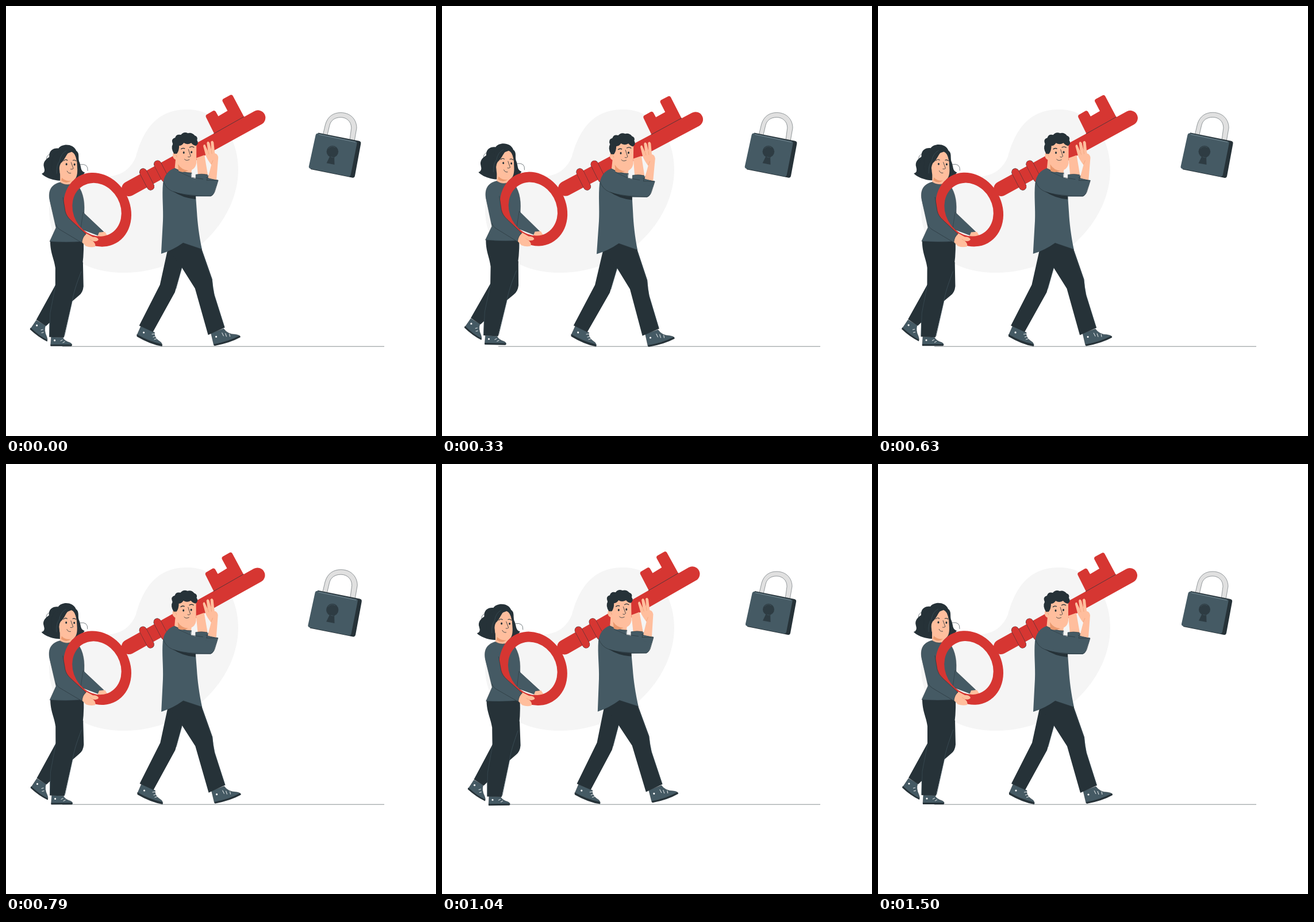
Write an HTML page with a canvas that moves like this. It is 748x748 px and loops after 1540 ms.

```html
<!DOCTYPE html>
<html lang="en">
<head>
<meta charset="utf-8">
<title>Key and padlock</title>
<style>
html, body { margin: 0; width: 100%; height: 100%; overflow: hidden; background: #fff; }
canvas { display: block; width: 100vw; height: 100vh; }
</style>
</head>
<body>
<canvas id="stage" width="748" height="748"></canvas>
<script>
const ctx = document.getElementById('stage').getContext('2d');
const DARK = '#263238', SLATE = '#455a64', RED = '#d63632', SKIN = '#ffbe9d', BLUSH = '#eb996e';
const LOOP = 1540, STEPS = 37;

const cache = new Map();
function path(d) {
  if (!cache.has(d)) cache.set(d, new Path2D(d));
  return cache.get(d);
}
function fill(color, d, edge) {
  ctx.fillStyle = color;
  ctx.fill(path(d));
  if (edge) line(d, edge);
}
function line(d, width = 0.7, color = DARK) {
  ctx.strokeStyle = color;
  ctx.lineWidth = width;
  ctx.stroke(path(d));
}
function dot(color, x, y, rx, ry = rx) {
  ctx.fillStyle = color;
  ctx.beginPath();
  ctx.ellipse(x, y, rx, ry, 0, 0, 2 * Math.PI);
  ctx.fill();
}

// Linear interpolation through [position, value] stops.
function track(stops, p) {
  const i = stops.findIndex(s => s[0] >= p);
  if (i <= 0) return stops[0][1];
  const [a, va] = stops[i - 1], [b, vb] = stops[i];
  return va + (vb - va) * (p - a) / (b - a);
}
const sway = p => track([[0, 0], [0.25, 1], [0.75, -1], [1, 0]], p);
const beat = p => track([[0, 1], [0.1, 1.1], [0.3, 1], [0.4, 1], [0.5, 1.1], [0.6, 1], [1, 1]], p);

function around(x, y, change, draw) {
  ctx.save();
  ctx.translate(x, y);
  change();
  ctx.translate(-x, -y);
  draw();
  ctx.restore();
}

function background() {
  ctx.fillStyle = '#fff';
  ctx.fillRect(0, 0, 748, 748);
  fill('#f5f5f5', 'M314 180C364 179 404 222 404 284C404 375 318 464 205 464C130 464 75 422 75 355C75 318 102 302 140 299C180 297 210 300 226 262C236 226 256 180 314 180Z');
  line('M98 592.2H658', 0.55);
}

function lock() {
  fill('#e0e0e0', 'M552 224L556 207C560 193 570 187 582 187C599 187 609 199 609 213L605 236L597 235L600 213C600 202 592 195 582 195C572 195 565 200 563 209L559 226Z', 0.45);
  fill(DARK, 'M544 221L613 235Q617 236 616 240L606 294Q605 298 601 297L531 283Z');
  fill(SLATE, 'M544 222L607 235.5Q610 236 609.5 239L599 292Q598 295.500 595 295L531 282Q527.500 281 528 278L539.500 225Q540.500 221.500 544 222Z');
  line('M545 224L607 237', 0.6, '#90a4ae');
  dot('#2e3c43', 568, 253, 10);
  fill('#2e3c43', 'M565 258L558 272.500L571.500 275L571 258Z');
  line('M561 248Q566 242 573 246M565 262L570 263', 0.6, SLATE);
}

function shoe(d, sole, laces, x, y) {
  fill(SLATE, d, 0.5);
  fill(DARK, sole);
  line(laces, 0.9, '#fff');
  dot('#fff', x, y, 1.6);
}

function woman() {
  shoe('M53 547L69 556Q66 565 71 575Q73 580 72 583L43 562Z',
       'M43 560Q60 576 72 581L72 584Q57 577 42 563Z',
       'M65 563L61 564M66 568L62 569', 54, 556);
  shoe('M79 576L99 577Q102 583 112 586Q116 588 115 591H78Z',
       'M78 589H114Q116 590 114 592H78Z', 'M99 581L95 583M103 584L99 586', 85, 582);
  fill(DARK, 'M90 450L134 446L135 488Q134 499 127 504L113 516L70 557L53 546L75 506L92 475Z');
  line('M127 475L117 500L113 516', 0.6, SLATE);
  fill(DARK, 'M77 409H135Q136 438 131 464C124 490 118 498 115 516L101 577L75.500 576L76 540L86 490V456C84 440 77 430 77 409Z');
  line('M131 462C122 486 118 498 115 516L102 575', 0.6, SLATE);
  line('M86 488L77 535L76 574', 0.5, SLATE);

  fill(DARK, 'M95 304C80 304 66 297 62 292Q69 290 66 281C63 272 70 266 75 263C74 251 83 247 91 248C97 239 117 239 122 252C129 257 124 266 128 273C131 281 129 287 137 290Q132 299 118 302Z');
  fill(SKIN, 'M94 290L94 307Q105 316 116 309L118 290Z');
  fill(SLATE, 'M94 307C78 311 73 322 76 338L87 386L76 410Q104 412 133 410L136 384V357C137 338 133 319 120 307Q106 315 94 307Z', 0.4);
  fill(SLATE, 'M134 359L170 393L162 400L130 388Z', 0.5);
  fill(SKIN, 'M162 394L172 393L178 402L158 404Z');

  fill(SKIN, 'M106 257C98 268 91 272 93 286C93 300 103 305 113 304C122 303 124 296 124 285L123 268Q120 256 114 254Z');
  fill(BLUSH, 'M97 299Q104 306 113 304Q105 311 96 304Z');
  fill(DARK, 'M116 250C104 255 104 267 95 274Q91 281 93 292L85 286L90 254L108 244Z');
  fill(DARK, 'M114 251Q121 257 123 271L126 270L125 256Z');
  dot(DARK, 105, 275.5, 1.5, 1.9);
  dot(DARK, 119, 276, 1.5, 1.9);
  line('M100 270Q103 266 107 269M116 269Q119 267 122 270', 1.1);
  line('M113 272L117 283Q115 285 112 284M106 287Q108 292 113 291', 0.8);
  line('M75 258Q66 265 74 272Q62 278 71 287M129 276Q143 274 142 287M91 253Q77 260 80 275Q77 287 84 293', 0.6);
  line('M105 252Q95 257 93 270Q87 277 88 292', 0.5, SLATE);
}

function womanArm() {
  fill(SKIN, 'M133 404L140 396L151 402Q160 402 161 407Q158 411 151 409Q157 414 155 419Q147 421 139 418L132 411Z');
  line('M151 409L146 406', 0.6, BLUSH);
  fill(SLATE, 'M84 313Q74 320 76 338L86 379Q88 386 94 389L132 412Q133 402 139 397L113 373Q105 366 103 357L99 332Q95 315 84 313Z');
  line('M87 380Q89 387 95 390L132 412Q133 402 139 397L113 373Q105 366 103 357L99 333', 0.6);
}

function key() {
  fill(RED, 'M362 222L347.500 193Q346.500 190 349 188.500L360 182Q363 181 364.500 183.500L369 191.500L385 182L376.500 166Q375 163 378 161L390 154.500Q393 153.500 394.500 156.500L414 193Z');
  ctx.lineCap = 'round';
  line('M214 318L438 194', 26, RED);
  ctx.lineCap = 'butt';
  line('M361 222L414 192', 0.7);
  ctx.lineCap = 'round';
  for (const [x, y] of [[245, 301.5], [270, 287.5]]) {
    const bar = `M${x - 6.5} ${y - 12.5}L${x + 6.5} ${y + 12.5}`;
    line(bar, 13.2, DARK);
    line(bar, 12.4, RED);
  }
  ctx.lineCap = 'butt';

  // The bow is an oval ring standing square to the shaft.
  const tilt = -29 * Math.PI / 180;
  ctx.fillStyle = RED;
  ctx.beginPath();
  ctx.ellipse(159, 354.5, 56.5, 66.5, tilt, 0, 2 * Math.PI);
  ctx.closePath();
  ctx.moveTo(158 + 41 * Math.cos(tilt), 354.5 + 41 * Math.sin(tilt));
  ctx.ellipse(158, 354.5, 41, 48, tilt, 0, 2 * Math.PI);
  ctx.fill('evenodd');
}

function man() {
  shoe('M235 557L259 568Q257 577 270 585Q273 589 272 591L228 573Z',
       'M228 571Q248 583 271 588L272 592Q252 589 228 575Z',
       'M261 570L254 571M262 574L256 576M265 578L258 580', 240, 568);
  shoe('M357 569L379 561Q386 571 399 571Q407 572 408 575L362 590Z',
       'M362 588Q386 584 407 573L408 576Q390 586 363 591Z',
       'M376 568L379 574M382 569L384 575M389 570L390 575', 366, 575);
  fill(DARK, 'M281 425L268 485L232 556L256 567L294 498L306 456L318 420Z');
  fill(DARK, 'M283 424L309 410L340 421L359 475Q360 490 363 503L381 559L352 572L329 491L306 455Z');
  line('M306 455L296 492', 0.6, SLATE);
  line('M340 424L358 475L362 500L380 558', 0.5, SLATE);

  fill(SKIN, 'M331 264L345 259L351 294L334 296Z');
  fill(SLATE, 'M330 293Q340 291 350 293L354 304L330 303Z', 0.5);
  fill(SKIN, 'M295 265L293 287Q306 298 322 292L324 276Z');
  fill(SLATE, 'M293 282Q276 288 273 308C271 330 274 352 273 374L270 431Q290 425 308 412L341 423C336 400 333 376 332 358L330 331H356Q361 329 363 322L369 303L348 298L338 302L322 298Q321 293 323 290Q309 290 293 282Z');
  line('M293 282Q309 291 323 290L322 298L300 288M308 412L341 423', 0.5);
  fill(DARK, 'M290 322Q308 329 330 330V336Q307 334 290 322Z');
  line('M274 305Q278 318 291 323Q310 330 356 330Q362 328 364 320L369 303L348 298M343 301L323 298', 0.6);

  fill(SKIN, 'M351 299L357 276Q350 267 347 259L343 244Q343 240 346 241L351 252L349 238Q351 233 354 238L357 250L356 236Q359 232 361 237L363 256Q368 257 369 263L366 302Z');
  line('M351 252L353 258M357 250L358 257M357 275L360 268', 0.6, BLUSH);
  fill(SLATE, 'M350 298Q361 303 369 303L366 313L348 308Z');
  line('M352 294L349 303L369 303', 0.6);

  fill(SKIN, 'M295 242Q303 231 317 232Q331 233 331 243L331 273Q329 286 315 286Q301 284 297 268Q289 266 290 258Q291 251 297 254Z');
  fill(BLUSH, 'M299 275Q306 286 317 286Q308 291 300 287Z');
  fill(DARK, 'M292 257Q286 247 290 240Q286 231 294 229Q296 222 304 224Q309 218 316 221Q323 219 328 225Q334 227 332 233Q336 239 330 243Q325 242 322 238Q315 242 309 238Q306 243 301 243Q301 252 297 257Z');
  dot(DARK, 309, 255, 1.5, 2);
  dot(DARK, 322.5, 254, 1.5, 2);
  line('M304 249Q307 246 311 248M319 246Q323 243 327 246', 1.3);
  line('M317 249L321 261Q319 264 316 262M310 266Q313 270 319 267', 0.8);
  line('M292 258Q296 257 297 263', 0.6, BLUSH);
}

function render(now) {
  const step = Math.floor((now % LOOP + 5) * STEPS / LOOP) % STEPS;
  const p = (step + 1) / STEPS;
  background();
  around(572, 242, () => ctx.scale(beat(p), beat(p)), lock);
  around(246, 373, () => ctx.rotate(sway(p) * Math.PI / 180), () => {
    woman();
    key();
    womanArm();
    man();
  });
}

const start = performance.now();
function tick() {
  render(performance.now() - start);
  requestAnimationFrame(tick);
}
ctx.lineJoin = 'round';
tick();
</script>
</body>
</html>
```
